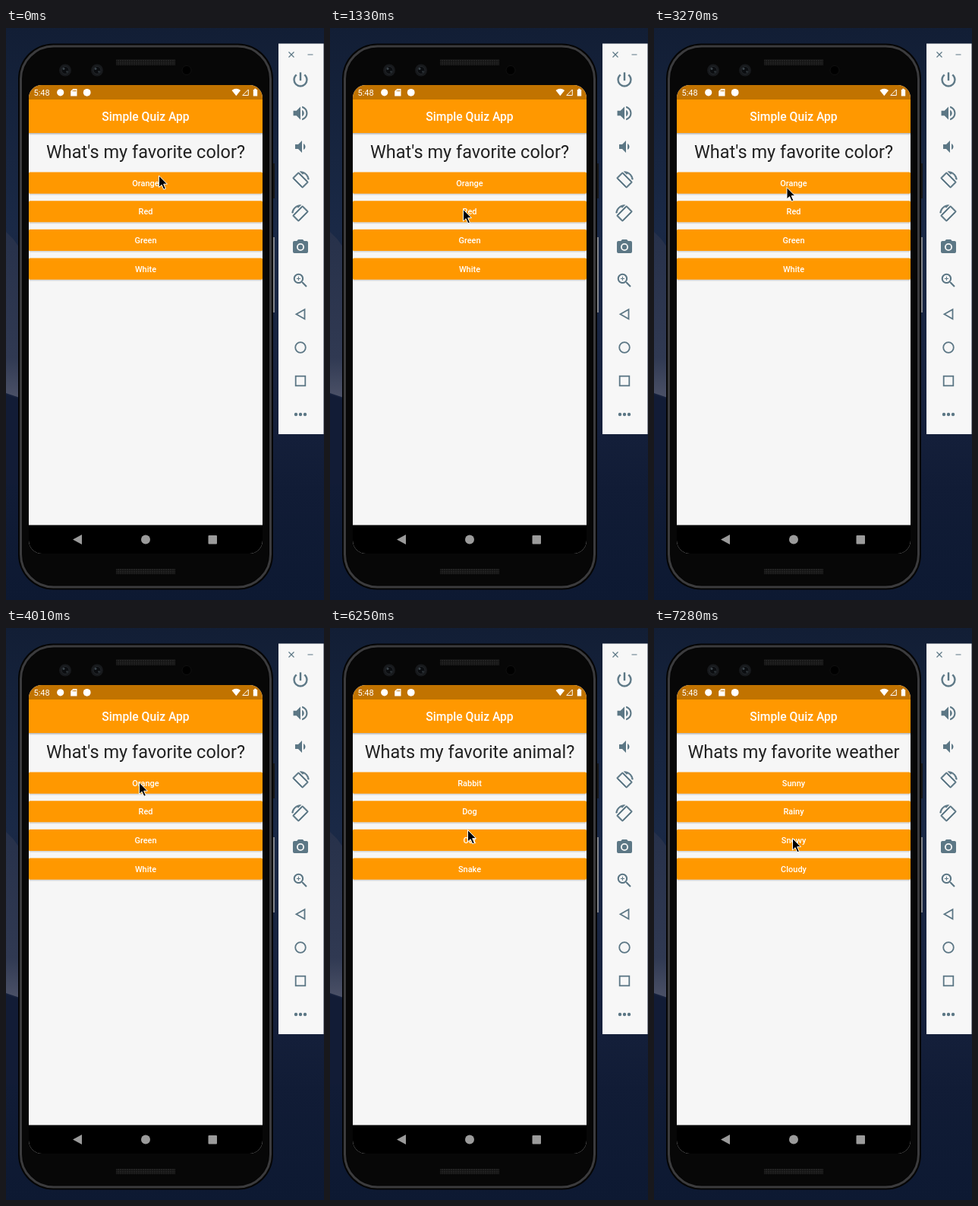
Recreate the animation shown at these times as an HTML page. Size 419 by 752 pixels, loop 8 s.

```html
<!DOCTYPE html>
<html lang="en">
<head>
<meta charset="utf-8">
<title>Simple Quiz App</title>
<style>
html, body { margin: 0; width: 100%; height: 100%; overflow: hidden; background: #0e1830; }
svg { display: block; width: 419px; height: 752px; }
text { font-family: Roboto, "Open Sans", sans-serif; }
.mid { text-anchor: middle; }
.label { font-size: 10.98px; font-weight: 500; fill: #fff; }
.line { fill: none; stroke: #5c7785; stroke-width: 1.8; }
</style>
</head>
<body>
<svg viewBox="0 0 419 752">
  <defs>
    <linearGradient id="sky" x2="0" y2="1">
      <stop offset="0" stop-color="#121e35"/>
      <stop offset=".35" stop-color="#1a2946"/>
      <stop offset=".62" stop-color="#17223e"/>
      <stop offset=".8" stop-color="#111c36"/>
      <stop offset="1" stop-color="#0d1932"/>
    </linearGradient>
    <linearGradient id="dune" x2="0" y2="1">
      <stop offset="0" stop-color="#27314a"/>
      <stop offset=".75" stop-color="#303952"/>
      <stop offset="1" stop-color="#4c5268"/>
    </linearGradient>
    <linearGradient id="shade" x2="0" y2="1">
      <stop offset="0" stop-opacity=".28"/>
      <stop offset="1" stop-opacity="0"/>
    </linearGradient>
    <pattern id="mesh" width="3" height="3" patternUnits="userSpaceOnUse">
      <rect width="3" height="3" fill="#141414"/>
      <circle cx="1" cy="1" r=".8" fill="#343434"/>
    </pattern>
    <clipPath id="screen"><rect x="30" y="75" width="308" height="616" rx="17"/></clipPath>
  </defs>

  <rect width="419" height="752" fill="url(#sky)"/>
  <path d="M0 268L10 278 24 298V488L0 480z" fill="url(#dune)"/>
  <path d="M0 482L24 490V600H0z" fill="#121c36"/>

  <!-- phone body -->
  <path d="M350 178h4v46h-4z" fill="#161616"/>
  <path d="M351.500 275h2.500v99h-2.500z" fill="#80838a"/>
  <rect x="16" y="20.500" width="336" height="718" rx="46" fill="#050505"/>
  <rect x="19.500" y="24" width="329" height="711" rx="43" fill="none" stroke="#3b3b3d" stroke-width="3"/>
  <rect x="22" y="26.500" width="324" height="706" rx="40" fill="#070707"/>
  <path d="M145 41h78v8h-78zM145 711h78v7h-78z" fill="url(#mesh)"/>
  <g id="lenses"></g>
  <circle cx="238" cy="55.500" r="6" fill="#000" stroke="#111"/>

  <!-- app -->
  <g clip-path="url(#screen)">
    <rect x="30" y="75" width="308" height="616" fill="#f6f6f6"/>
    <rect x="30" y="138" width="308" height="3" fill="url(#shade)"/>
    <rect x="30" y="75" width="308" height="19" fill="#c17300"/>
    <rect x="30" y="94" width="308" height="44" fill="#ff9800"/>
    <rect x="30" y="653.500" width="308" height="38" fill="#000"/>
  </g>
  <g fill="#fff">
    <text x="36.500" y="88.800" font-size="11">5:48</text>
    <circle cx="71.700" cy="84.800" r="4.600"/>
    <path fill-rule="evenodd" d="M88.300 80h5.200v9.500h-8.300v-6.400zM88 81.500v2h1v-2zM90 81.500v2h1v-2zM91.500 81.500v2h.8v-2z"/>
    <circle cx="106.700" cy="84.800" r="4.900"/>
    <path d="M297.500 82q5.800-4.500 11.600 0l-5.800 7.300z"/>
    <path d="M311.800 88.500h7.500V81z" fill="none" stroke="#fff" stroke-width="1"/>
    <path d="M325.800 81h1.400v-1.200h2.600V81h1.400v8.500h-5.400z"/>
    <text class="mid" x="184" y="122" font-size="15.690" font-weight="500">Simple Quiz App</text>
  </g>
  <text id="question" class="mid" x="184" y="171.200" font-size="23.530" fill="#212121"></text>
  <g id="buttons"></g>
  <g fill="#9b9b9b">
    <path d="M88 672.500l12-6.500v13z"/>
    <circle cx="184" cy="672.500" r="6"/>
    <rect x="266.500" y="667" width="11.500" height="11.500" rx="1"/>
  </g>

  <!-- emulator controls -->
  <rect x="359" y="20.500" width="59.500" height="513.500" fill="#f7f7f7"/>
  <path class="line" style="stroke-width:1.200" d="M372.500 31.500l7 7m0-7l-7 7M397.500 35h7"/>
  <g id="tools" fill="#5c7785" fill-rule="evenodd" stroke="#5c7785" stroke-width="0"></g>
  <path class="line" d="M393.500 370v12.500l-11-6.250z"/>
  <circle class="line" cx="388" cy="420" r="6.800"/>
  <rect class="line" x="381.700" y="457.700" width="12.600" height="12.600"/>
  <g fill="#5c7785">
    <circle cx="382" cy="508" r="2.200"/><circle cx="388" cy="508" r="2.200"/><circle cx="394" cy="508" r="2.200"/>
  </g>

  <path id="cursor" d="M0 0V15.500L3.600 12.200 6.300 18.300 8.900 17.200 6.200 11.200H11z" stroke="#fff" stroke-width="1"/>
</svg>
<script>
const LOOP = 8000;
const $ = id => document.getElementById(id);

const quiz = [
  [0, "What's my favorite color?", "Orange", "Red", "Green", "White"],
  [5360, "Whats my favorite animal?", "Rabbit", "Dog", "Cat", "Snake"],
  [6980, "Whats my favorite weather", "Sunny", "Rainy", "Snowy", "Cloudy"]
];

// time, x, y of the pointer tip
const pointer = [
  [0, 201.5, 194], [150, 153.5, 189.5], [290, 148.5, 192.5], [440, 153.5, 196.5],
  [590, 165.5, 202.5], [740, 173.5, 214.5], [880, 173.5, 218.5], [1030, 181.5, 265.5],
  [1180, 182, 263], [1330, 175.5, 238.5], [2680, 177.5, 245.5], [2830, 179.5, 249.5],
  [3130, 179.5, 242.5], [3270, 175, 209.5], [3870, 175.5, 208.5], [4010, 175.5, 203],
  [6100, 176.5, 223], [6250, 181.5, 265.5], [6390, 181.5, 269.5], [6540, 182.5, 275.5],
  [6690, 182.5, 276.5]
];

$("lenses").innerHTML = [78, 120].map(x => `
  <circle cx="${x}" cy="55.5" r="8" fill="#17191c"/>
  <circle cx="${x}" cy="55.5" r="5" fill="#0b0d10" stroke="#25292d"/>
  <circle cx="${x - 2}" cy="53.5" r="1.5" fill="#3d464c"/>
  <circle cx="${x + 2.5}" cy="57.5" r="1.2" fill="#30383d"/>`).join("");

$("buttons").innerHTML = [0, 1, 2, 3].map(i => {
  const y = 189.5 + i * 37.65;
  return `<rect x="30" y="${y + 1}" width="308" height="29" rx="2" opacity=".12"/>
    <rect x="30" y="${y}" width="308" height="28.2" rx="1.6" fill="#ff9800"/>
    <rect class="flash" x="30" y="${y}" width="308" height="28.2" rx="1.6" fill="#fff" opacity="0"/>
    <text class="mid label" x="184" y="${y + 18.1}"></text>`;
}).join("");

// y, horizontal scale, scale, extra weight, 24-unit icon outline
const rotate = "M16.48 2.52c3.27 1.55 5.61 4.72 5.97 8.48h1.5C23.44 4.84 18.29 0 12 0l-.66.03 3.81 3.81zM10.23 1.75c-.59-.59-1.54-.59-2.12 0L1.75 8.11c-.59.59-.59 1.54 0 2.12l12.02 12.02c.59.59 1.54.59 2.12 0l6.36-6.36c.59-.59.59-1.54 0-2.12zM14.83 21.19L2.81 9.17l6.36-6.36 12.02 12.02z";
const tools = [
  [68, 1, 1.05, 0.3, "M13 3h-2v10h2zM17.83 5.17l-1.42 1.42C17.99 7.86 19 9.81 19 12c0 3.87-3.13 7-7 7s-7-3.13-7-7c0-2.19 1.01-4.14 2.58-5.42L6.17 5.17C4.23 6.82 3 9.26 3 12a9 9 0 0 0 18 0c0-2.74-1.23-5.18-3.17-6.83z"],
  [112, 1, 1.05, 0, "M3 9v6h4l5 5V4L7 9zM16.5 12c0-1.77-1.02-3.29-2.5-4.03v8.05c1.48-.73 2.5-2.25 2.5-4.02zM14 3.23v2.06c2.89.86 5 3.54 5 6.71s-2.11 5.85-5 6.71v2.06c4.01-.91 7-4.49 7-8.77s-2.99-7.86-7-8.77z"],
  [156, 1, 1, 0, "M18.5 12c0-1.77-1.02-3.29-2.5-4.03v8.05c1.48-.73 2.5-2.25 2.5-4.02zM5 9v6h4l5 5V4L9 9z"],
  [200, 1, 0.94, 0.9, rotate],
  [244, -1, 0.94, 0.9, rotate],
  [288, 1, 1, 0, "M9 2L7.17 4H4a2 2 0 0 0-2 2v12a2 2 0 0 0 2 2h16a2 2 0 0 0 2-2V6a2 2 0 0 0-2-2h-3.17L15 2zM12 17a5 5 0 1 1 0-10 5 5 0 0 1 0 10zM12 15.200a3.200 3.200 0 1 0 0-6.400 3.200 3.200 0 0 0 0 6.400z"],
  [332, 1, 1.03, 0, "M15.500 14h-.79l-.28-.27A6.500 6.500 0 1 0 13.730 14.430l.27.28v.79l5 4.990L20.490 19zM9.500 14a4.500 4.500 0 1 1 0-9 4.500 4.500 0 0 1 0 9zM9 7h1v2h2v1h-2v2H9v-2H7V9h2z"]
];
$("tools").innerHTML = tools.map(([y, flip, s, weight, d]) =>
  `<path transform="translate(388 ${y}) scale(${flip * s} ${s}) translate(-12 -12)" stroke-width="${weight}" d="${d}"/>`).join("");

const labels = document.querySelectorAll(".label");
const flash = document.querySelectorAll(".flash")[2];
const latest = (steps, t) => steps.filter(step => step[0] <= t).pop();
let shown;

function draw(now) {
  const t = now % LOOP;
  const page = latest(quiz, t);
  if (page !== shown) {
    shown = page;
    const [, question, ...answers] = page;
    $("question").textContent = question;
    labels.forEach((label, i) => label.textContent = answers[i]);
  }
  flash.setAttribute("opacity", t >= 6980 && t < 7130 ? 0.12 : 0);
  const [, x, y] = latest(pointer, t);
  $("cursor").setAttribute("transform", `translate(${x} ${y})`);
}

const start = performance.now();
function tick() {
  draw(performance.now() - start);
  requestAnimationFrame(tick);
}
tick();
</script>
</body>
</html>
```
